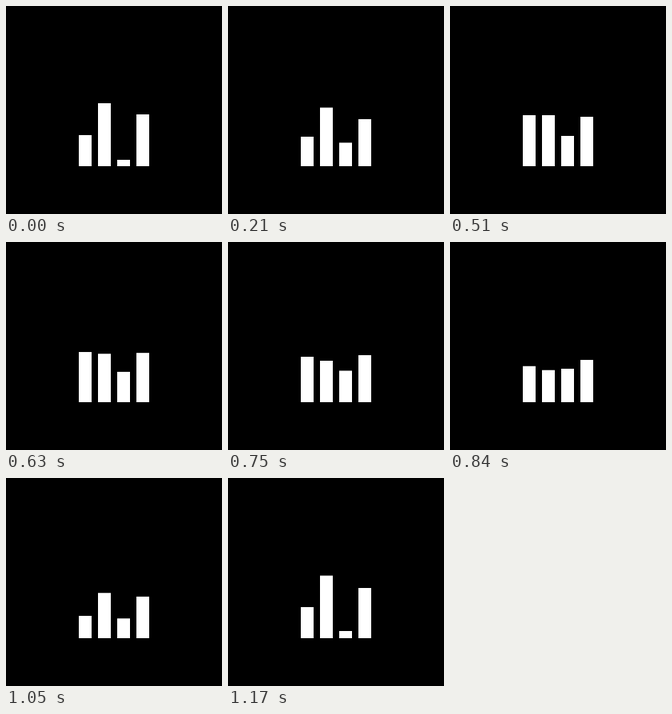
Recreate the animation shown at these times as an HTML page. Size 270 px wide and 261 px high, loop 1200 ms.

```html
<!DOCTYPE html>
<html lang="en">
<head>
<meta charset="utf-8">
<title>Equalizer</title>
<style>
  html, body { margin: 0; width: 100%; height: 100%; overflow: hidden; background: #000; }
  svg { display: block; width: 270px; height: 261px; }
  rect { fill: #fff; }
</style>
</head>
<body>
<svg viewBox="0 0 270 261"></svg>
<script>
const LOOP = 1200, STEP = 30, BASE = 201;
const times = [0, 210, 330, 370, 510, 600, 750, 930, 980, 1080, 1170];
const levels = [
  [39, 37, 33, 31.5, 64, 63.5, 57, 29, 20, 32, 39],
  [79, 73.5, 64, 61, 64, 62, 52, 28, 24, 69, 78.5],
  [8, 29.5, 66, 76, 38, 38, 39.5, 45.5, 48, 16, 9],
  [65, 59, 47, 43, 62, 62, 59, 45, 41, 57, 63]
];
const count = times.length;
const svg = document.querySelector('svg');

const bars = levels.map((_, i) => {
  const bar = document.createElementNS('http://www.w3.org/2000/svg', 'rect');
  bar.setAttribute('x', 91 + 24 * i);
  bar.setAttribute('width', 16);
  return svg.appendChild(bar);
});

const wrap = i => (i + count) % count;
const span = i => (times[wrap(i + 1)] - times[wrap(i)] + LOOP) % LOOP;
const slope = (v, i) => (v[wrap(i + 1)] - v[wrap(i)]) / span(i);

// Tangent that is flat at every peak and dip
function tangent(v, i) {
  const a = slope(v, i - 1), b = slope(v, i);
  return a * b > 0 ? 2 * a * b / (a + b) : 0;
}

function levelAt(v, t) {
  const i = times.findLastIndex(k => k <= t);
  const d = span(i), u = (t - times[i]) / d, w = 1 - u;
  return w * w * ((1 + 2 * u) * v[i] + u * d * tangent(v, i))
       + u * u * ((3 - 2 * u) * v[wrap(i + 1)] - w * d * tangent(v, i + 1));
}

function draw(now) {
  const t = Math.floor(now % LOOP / STEP) * STEP;
  bars.forEach((bar, i) => {
    const h = levelAt(levels[i], t);
    bar.setAttribute('y', BASE - h);
    bar.setAttribute('height', h);
  });
}

let start;
function tick(now) {
  start ??= now;
  draw(now - start);
  requestAnimationFrame(tick);
}
draw(0);
requestAnimationFrame(tick);
</script>
</body>
</html>
```
